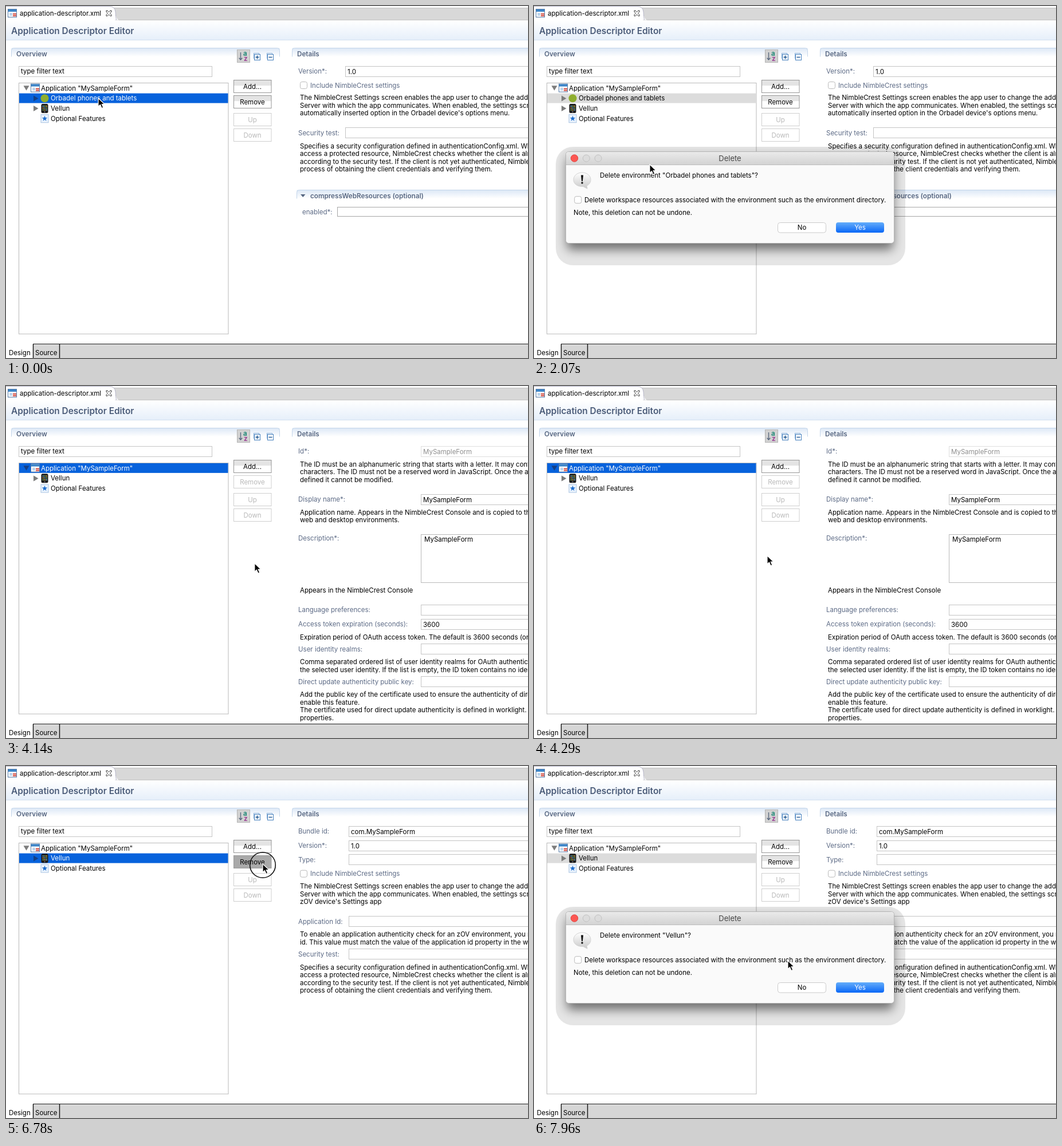
Recreate the animation shown at these times as an HTML page. Size 911 px wide and 615 px high, loop 8 s.

```html
<!DOCTYPE html>
<html lang="en">
<head>
<meta charset="utf-8">
<title>Descriptor editor</title>
<style>
html, body { margin: 0; width: 100%; height: 100%; overflow: hidden; background: #fff; }
svg { display: block; width: 911px; height: 615px; }
text { font: 11.5px Inter, "Open Sans", sans-serif; fill: #000; white-space: pre; }
.label { fill: #5c6a85; }
.head { font-weight: 600; font-size: 11.7px; fill: #566681; }
.title { font-weight: 600; font-size: 15.4px; fill: #4b5c79; }
.bar { font-size: 13px; fill: #454545; }
.off { fill: #b9b9b9; }
.gray { fill: #8e8e8e; }
.sel { fill: #fff; }
.mid { text-anchor: middle; }
</style>
</head>
<body>
<svg viewBox="0 0 911 615">
  <defs>
    <linearGradient id="header" x2="0" y2="1"><stop stop-color="#fff"/><stop offset="1" stop-color="#e6effa"/></linearGradient>
    <linearGradient id="section" x2="0" y2="1"><stop stop-color="#dce8f6"/><stop offset="1" stop-color="#fff"/></linearGradient>
    <linearGradient id="button" x2="0" y2="1"><stop offset=".42" stop-color="#e4e4e4"/><stop offset=".46" stop-color="#fff"/></linearGradient>
    <linearGradient id="bar" x2="0" y2="1"><stop stop-color="#eaeaea"/><stop offset="1" stop-color="#d3d3d3"/></linearGradient>
    <linearGradient id="yes" x2="0" y2="1"><stop stop-color="#64adfa"/><stop offset="1" stop-color="#0967f7"/></linearGradient>
    <linearGradient id="bubble" x2="0" y2="1"><stop stop-color="#fff"/><stop offset="1" stop-color="#c9c9c9"/></linearGradient>
    <filter id="soft" x="-10%" y="-30%" width="120%" height="170%"><feGaussianBlur stdDeviation="9"/></filter>
  </defs>
  <g id="frame"></g>
  <g id="tree"></g>
  <g id="buttons"></g>
  <g id="details"></g>
  <g id="dialog"></g>
  <g id="pointer">
    <circle id="ring" cx="0" cy="2" r="22.3" fill="none" stroke="#111" stroke-width="1.6"/>
    <path d="M0 0V14.8L3.5 11.6 6.1 17.6 8.8 16.4 6.3 10.6H11Z" stroke="#fff" stroke-width="1.2"/>
  </g>
</svg>
<script>
const layer = id => document.getElementById(id);
const text = (x, y, s, cls = '') => `<text x="${x}" y="${y}" class="${cls}">${s}</text>`;
const rect = (x, y, w, h, fill, stroke = 'none', more = '') =>
  `<rect x="${x}" y="${y}" width="${w}" height="${h}" fill="${fill}" stroke="${stroke}" ${more}/>`;
const path = (d, stroke, fill = 'none', more = '') =>
  `<path d="${d}" stroke="${stroke}" fill="${fill}" ${more}/>`;
const circle = (x, y, r, fill, stroke = 'none') =>
  `<circle cx="${x}" cy="${y}" r="${r}" fill="${fill}" stroke="${stroke}"/>`;
const lines = (y, ...rows) => rows.map((s, i) => text(513, y + i * 13.55, s)).join('');
const label = (y, s) => text(510, y, s, 'label');
const field = (x, y, s = '', cls = '', h = 18, color = '#c4c4c4') =>
  rect(x + .5, y + .5, 400, h, '#fff', color) + text(x + 4, y + 13.5, s, cls);
const checkbox = (x, y, on) =>
  rect(x, y, 12, 12, on ? '#2c80f7' : '#fff', on ? '#2372e8' : '#b9b9b9', 'rx="3"') +
  (on ? path(`M${x + 3} ${y + 6.5}l2.3 2.6 4-6.2`, '#fff', 'none', 'stroke-width="1.7"') : '');
const section = (x, y, w, name, dx = 9) =>
  rect(x, y, w, 15, 'url(#section)') +
  path(`M${x} ${y + 15}V${y + 4}q0-4 4-4H${x + w - 4}q4 0 4 4v11`, '#c3d5ea') +
  text(x + dx, y + 14, name, 'head');

const appName = 'MySampleForm', platform = 'NimbleCrest';
const phoneA = 'Orbadel', phoneB = 'Vellun', systemB = 'zOV';
const robotRow = `${phoneA} phones and tablets`;

const icons = {
  app: (x, y) => rect(x + .5, y + .5, 15, 14, '#fff', '#557ba8') + rect(x + 1, y + 1, 14, 4, '#3c85c8') +
    rect(x + 3, y + 7, 5, 5, '#bcd4ec') + rect(x + 9, y + 8, 6, 2, '#d4473c') + rect(x + 9, y + 11, 6, 2, '#d4473c'),
  robot: (x, y) => circle(x + 8, y + 8, 7, '#8fae2f'),
  phone: (x, y) => {
    const dots = Array.from({ length: 9 }, (_, i) => rect(x + 4.2 + i % 3 * 3, y + 3 + (i / 3 | 0) * 3.3, 2, 2,
      ['#6aa8d8', '#d9a544', '#7bb661'][(i * 2 + (i / 3 | 0)) % 3]));
    return rect(x + 2, y, 12, 16, '#1c1c1c', 'none', 'rx="2.5"') + dots.join('') + circle(x + 8, y + 14, .9, '#999');
  },
  star: (x, y) => {
    const points = Array.from({ length: 10 }, (_, i) => {
      const r = i % 2 ? 2.1 : 5, a = i * Math.PI / 5;
      return `${x + 8 + r * Math.sin(a)} ${y + 8 - r * Math.cos(a)}`;
    });
    return rect(x + 1.5, y + 1, 13, 14, '#eaf3fd', '#a9c4e2') + path(`M${points.join('L')}Z`, 'none', '#1f6fd0');
  }
};

function drawFrame() {
  const boxIcon = (x, plus) => rect(x + 2.5, 82.5, 9, 9, '#fff', '#8fb4dc') + rect(x + .5 + 3, 84.5, 10, 10, '#fff', '#4580bd') +
    path(`M${x + 5.5} 89.5h6${plus ? 'm-3-3v6' : ''}`, '#1d5590', 'none', 'stroke-width="1.4"');
  return rect(184, 4, 727, 20, '#d8d8d8') + path('M184 3.5H911M190 24.5H911', '#c2c2c2') +
    path('M0 .5H180Q190 .5 191 10Q192 24.5 198 24.5H0Z', 'none', '#fff') +
    path('M0 .5H180Q190 .5 191 10Q191.5 20 192.5 24.5', '#b5b5c8') +
    icons.app(3, 5) + text(24, 17, 'application-descriptor.xml') +
    path('M175 8h2l2.5 2.5L182 8h2v2l-2.5 2.7 2.5 2.7v2h-2l-2.5-2.6-2.5 2.6h-2v-2l2.5-2.7-2.5-2.7Z', '#333', '#fff') +
    rect(0, 25, 911, 34, 'url(#header)') + path('M0 59.5H911', '#d3e0f0') +
    text(9, 49, 'Application Descriptor Editor', 'title') +
    section(9.5, 73.5, 468, 'Overview', 8.5) + section(499.5, 73.5, 420, 'Details', 8.5) +
    rect(403.5, 76.5, 22, 22, '#d2d2d2', '#b4b4b4') +
    path('M409.5 81v13m-2.8-3.2 2.8 3.2 2.8-3.2', '#55657c', 'none', 'stroke-width="1.3"') +
    '<text x="414" y="87" style="font-weight:700;fill:#228a78">a</text>' +
    '<text x="415" y="96" style="font-weight:700;fill:#9a3f94">z</text>' +
    boxIcon(430, true) + boxIcon(453, false) +
    rect(22.5, 105.5, 337, 18, '#fff', '#c6c6c6') + text(26, 118.2, 'type filter text') +
    rect(22.5, 134.5, 365.5, 438.5, '#fff', '#b9b9b9') +
    rect(47, 591, 864, 24, '#d6d6d6') + path('M47 590.5H911', '#222') +
    path('M47.5 615V591M93.5 615V591', '#111', 'none', 'stroke-width="1.4"') +
    text(5, 609.5, 'Design') + text(51, 609.5, 'Source');
}

function drawTree(mode, inactive) {
  const rows = [['app', `Application "${appName}"`], ['phone', phoneB], ['star', 'Optional Features']];
  if (mode === 'robot') rows.splice(1, 0, ['robot', robotRow]);
  const selected = mode === 'app' ? 0 : 1;
  return rows.map(([icon, name], i) => {
    const y = 134.7 + i * 17.7, x = i ? 59.5 : 43, on = i === selected, lit = on && !inactive;
    const fill = lit ? '#143f86' : '#7d7d7d';
    const arrow = icon === 'star' ? '' : i ? path(`M48 ${y + 4}v10l8.5-5Z`, 'none', fill) : path(`M30.5 ${y + 4.5}h10l-5 8.5Z`, 'none', fill);
    return (on ? rect(23, y + .2, 364.5, 17, lit ? '#0762dc' : '#dcdcdc') : '') + arrow +
      icons[icon](x, y + .9) + text(i ? 78 : 61, y + 12.9, name, lit ? 'sel' : '');
  }).join('');
}

function drawButtons(mode, pressed) {
  const button = (y, name, on, down) =>
    rect(397.5, y + .5, 65.5, 22, down ? '#a9a9a9' : on ? 'url(#button)' : '#fff', down ? '#9b9b9b' : on ? '#969696' : '#cfcfcf') +
    text(430, y + 15.5, name, 'mid' + (on ? '' : ' off'));
  return button(129, 'Add...', true) + button(156, 'Remove', mode !== 'app', pressed) +
    button(187, 'Up') + button(214, 'Down');
}

const securityNote = y => lines(y,
  'Specifies a security configuration defined in authenticationConfig.xml. When a client',
  `access a protected resource, ${platform} checks whether the client is already verified`,
  `according to the security test. If the client is not yet authenticated, ${platform} starts`,
  'process of obtaining the client credentials and verifying them.');
const settingsNote = (y, last) => checkbox(513.5, y - 26, false) +
  text(531, y - 15.8 - 5.8, `Include ${platform} settings`, 'label') + lines(y,
  `The ${platform} Settings screen enables the app user to change the address of the`,
  'Server with which the app communicates. When enabled, the settings screen is', last);

const details = {
  robot: () => label(117.5, 'Version*:') + field(592, 105, '1.0') +
    settingsNote(164.3, `automatically inserted option in the ${phoneA} device's options menu.`)
      .replace('y="138.3"', 'y="132.5"').replace('y="142.70000000000002"', 'y="142.7"') +
    label(225.5, 'Security test:') + field(592, 212) + securityNote(248.5) +
    section(507.5, 321.5, 420, 'compressWebResources (optional)', 23.5) +
    path('M514 329h8.5l-4.25 5Z', 'none', '#566681') +
    text(517, 363.5, 'enabled*:', 'label') + field(578, 351, '', '', 16, '#a6a6a6'),
  app: () => label(117.5, 'Id*:') + field(724, 105, appName, 'gray', 18, '#dedede') + lines(140.5,
      'The ID must be an alphanumeric string that starts with a letter. It may contain other',
      'characters. The ID must not be a reserved word in JavaScript. Once the app id is',
      'defined it cannot be modified.') +
    label(201.5, 'Display name*:') + field(724, 189, appName) + lines(224.5,
      `Application name. Appears in the ${platform} Console and is copied to the mobile,`,
      'web and desktop environments.') +
    label(270, 'Description*:') + rect(724.5, 259.5, 400, 84, '#fff', '#b9b9b9') + text(730, 271.7, appName) +
    lines(360.5, `Appears in the ${platform} Console`) +
    label(394.8, 'Language preferences:') + field(724, 382) +
    label(419.8, 'Access token expiration (seconds):') + field(724, 407, '3600') +
    lines(442.5, 'Expiration period of OAuth access token. The default is 3600 seconds (one hour).') +
    label(463.5, 'User identity realms:') + field(724, 450) + lines(486.3,
      'Comma separated ordered list of user identity realms for OAuth authentication, for',
      'the selected user identity. If the list is empty, the ID token contains no identity.') +
    label(520.8, 'Direct update authenticity public key:') + field(724, 507) + lines(543.3,
      'Add the public key of the certificate used to ensure the authenticity of direct updates to',
      'enable this feature.',
      'The certificate used for direct update authenticity is defined in worklight.',
      'properties.'),
  phone: () => label(117.5, 'Bundle id:') + field(598, 105, `com.${appName}`) +
    label(142.5, 'Version*:') + field(598, 130, '1.0') + label(167.5, 'Type:') + field(598, 154) +
    settingsNote(214, `${systemB} device's Settings app`).replace('y="188"', 'y="182.2"') +
    label(275.5, 'Application Id:') + field(598, 262) + lines(298.3,
      `To enable an application authenticity check for an ${systemB} environment, you must set the`,
      'id. This value must match the value of the application id property in the webpage.') +
    label(332.5, 'Security test:') + field(598, 319) + securityNote(355.5)
};

function drawDialog(mode, checked) {
  const name = mode === 'robot' ? robotRow : phoneB;
  return rect(38, 246, 610, 207, '#000', 'none', 'rx="30" opacity=".1"') +
    rect(57, 264, 570, 162, '#000', 'none', 'rx="8" opacity=".5" filter="url(#soft)"') +
    rect(55.5, 254.5, 573, 160, '#fafafa', '#b4b4b4', 'rx="5"') +
    path('M56 277V260q0-5 5-5H623q5 0 5 5v17Z', 'none', 'url(#bar)') + path('M56 277.5H628', '#bdbdbd') +
    circle(70.5, 266, 6.2, '#fc5753', '#df4744') + circle(91.3, 266, 6, '#dcdcdc', '#c2c2c2') + circle(112, 266, 6, '#dcdcdc', '#c2c2c2') +
    text(342, 271, 'Delete', 'bar mid') +
    path('M84 291c8.5 0 15 5.4 15 12.5 0 5-3 8.800-7 10.700l1 5-7-3.700c-10 .5-17-4.500-17-12 0-7.100 6.500-12.500 15-12.500Z', '#d2d2d2', 'url(#bubble)') +
    path('M82 295.500h4l-1.100 10.500h-1.800Z', 'none', '#111') + circle(84, 309, 1.7, '#111') +
    text(115, 300.3, `Delete environment "${name}"?`) + checkbox(70.7, 332.700, checked) +
    text(88, 343, 'Delete workspace resources associated with the environment such as the environment directory.') +
    text(69, 364.800, 'Note, this deletion can not be undone.') +
    rect(425.5, 378.5, 84, 17.500, '#fff', '#cbcbcb', 'rx="4"') + text(467.5, 391.3, 'No', 'mid') +
    rect(527, 378, 84, 18, 'url(#yes)', 'none', 'rx="4"') + text(569, 391.3, 'Yes', 'mid sel');
}

// Pointer stops: tick, x, y
const stops = [[0, 161, 161], [2, 161, 161], [7, 432, 164.500], [11, 432, 164.500], [16, 77, 338], [18, 77, 338],
  [22, 579, 381], [25, 579, 381], [29, 407, 296.500], [34, 174, 162], [40, 174, 162], [45, 448, 171], [49, 448, 171], [54, 443, 340]];
const LOOP = 8000, TICK = 147.3;
const within = (n, a, b) => n >= a && n < b;

function pointerAt(n) {
  const i = Math.max(1, stops.findIndex(s => s[0] >= n));
  const [a, x, y] = stops[i - 1], [b, u, v] = stops[i];
  const k = (n - a) / (b - a);
  const e = k * k * (3 - 2 * k);
  return [x + (u - x) * e, y + (v - y) * e];
}

const drawn = {};
function update(id, draw, ...args) {
  const key = args.join();
  if (drawn[id] === key) return;
  drawn[id] = key;
  layer(id).innerHTML = draw(...args);
}

function render(now) {
  const n = Math.min(54, Math.floor(now % LOOP / TICK));
  const mode = n < 26 ? 'robot' : n < 40 ? 'app' : 'phone';
  const open = within(n, 11, 25) || n >= 49;
  update('frame', drawFrame);
  update('tree', drawTree, mode, open);
  update('buttons', drawButtons, mode, within(n, 8, 10) || within(n, 46, 48));
  update('details', m => details[m](), mode);
  update('dialog', (m, show, on) => show ? drawDialog(m, on) : '', mode, open, n >= 17 && n < 25);
  layer('pointer').setAttribute('transform', `translate(${pointerAt(n)})`);
  const ring = within(n, 9, 11) || within(n, 17, 19) || n === 24 || within(n, 39, 41) || within(n, 46, 48);
  layer('ring').style.display = ring ? '' : 'none';
  requestAnimationFrame(render);
}
render(0);
</script>
</body>
</html>
```
